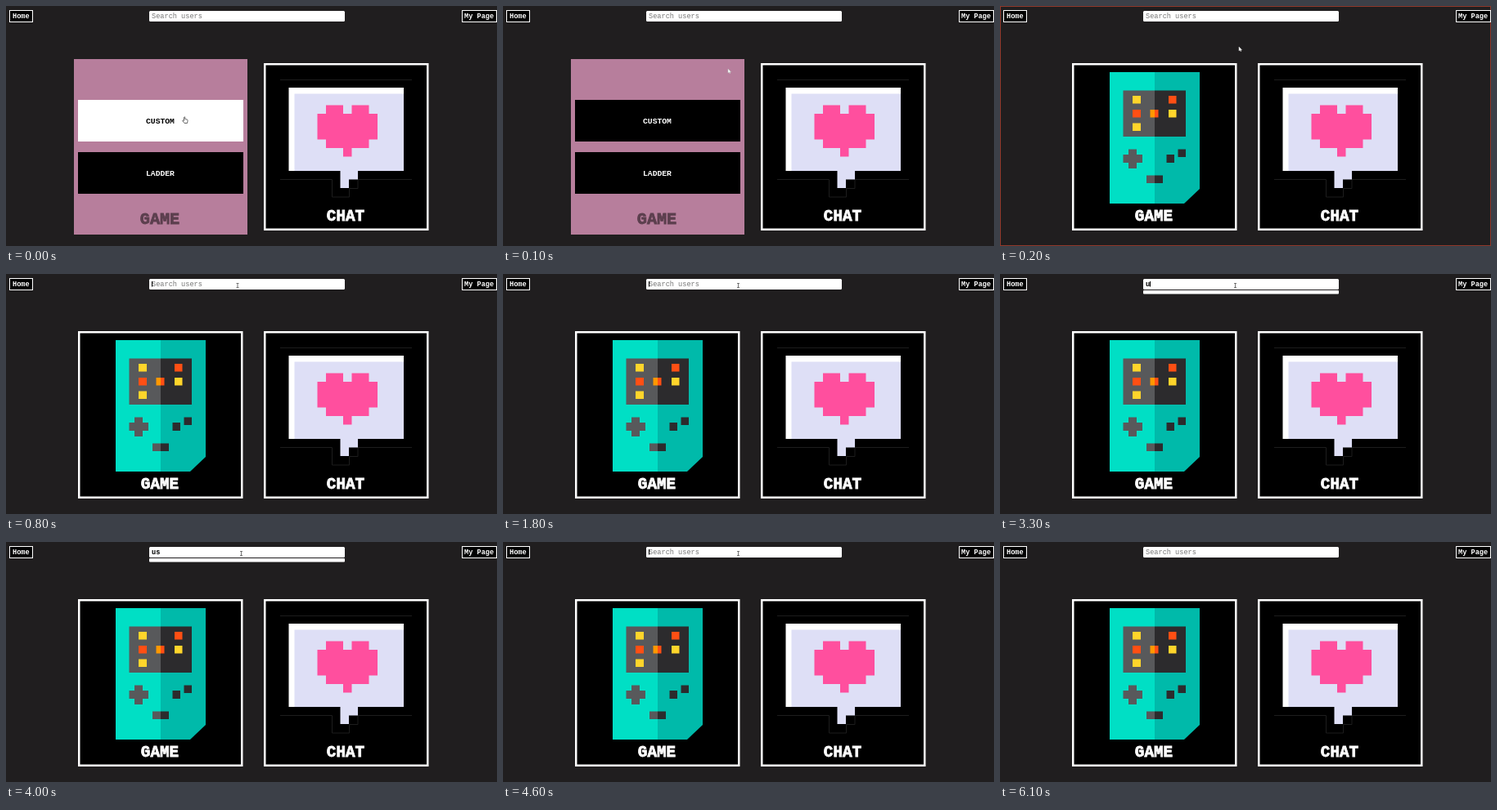
These frames come from a looping animation (600 px wide and 294 px high, 6.2 s). An HTML page:

```html
<!DOCTYPE html>
<html lang="en">
<head>
<meta charset="utf-8">
<title>Lobby</title>
<style>
  html, body { margin: 0; width: 100%; height: 100%; overflow: hidden; background: #201e1f; }
  svg { display: block; }
  text { font: bold 8.6px "Liberation Mono", monospace; fill: #fff; }
  .mid { text-anchor: middle; }
  .title { font-size: 19.3px; stroke: #fff; stroke-width: .8; }
  .option { font-size: 9.7px; stroke-width: .25; }
  .frame { fill: #000; stroke: #fff; stroke-width: 2.5; }
  .nav { fill: #000; stroke: #fff; }
  .hover rect, .dark { fill: #fff; }
  .hover text { fill: #000; }
</style>
</head>
<body>
<svg width="600" height="294" viewBox="0 0 600 294">
  <rect width="600" height="294" fill="#201e1f"/>
  <rect id="edge" x=".5" y=".5" width="599" height="293" fill="none" stroke="#90392b"/>

  <rect class="nav" x="4.5" y="5.5" width="28" height="14"/>
  <text x="8" y="15">Home</text>
  <rect class="nav" x="557.5" y="5.5" width="42" height="14"/>
  <text x="560" y="15">My Page</text>

  <rect x="175" y="6" width="239" height="13" rx="1.5" fill="#fff"/>
  <rect id="results" x="175" y="20" width="239" height="4.5" rx="1" fill="#fff"/>
  <text id="query" x="178" y="15"></text>
  <rect id="caret" y="9" width="1" height="6.5" fill="#000"/>

  <g id="game">
    <rect class="frame" x="89.25" y="71.25" width="199" height="202.5"/>
    <path fill="#00dfc5" d="M134 81h55v161h-55z"/>
    <path fill="#00baaa" d="M189 81h55v143l-19 18h-36z"/>
    <path fill="#58595b" d="M150.5 103.5h38.5v56.5h-38.5zM150.5 182h6.5v-6.5h10v6.5h7v10h-7v7h-10v-7h-6.5zM179 207.5h10v9.5h-10z"/>
    <path fill="#2c2b2d" d="M189 103.5h38v56.5h-38zM203.5 182h9.5v10h-9.5zM217.5 175.5h9.5v9.5h-9.5zM189 207.5h10v9.5h-10z"/>
    <path fill="#ffd52b" d="M162 110h10v9.5h-10zM206 127h9.5v9.5h-9.5zM162 143.5h10v9.5h-10z"/>
    <path fill="#ff4f14" d="M206 110h9.5v9.5h-9.5zM162 127h10v9.5h-10zM189 127h4.5v9.5h-4.5z"/>
    <path fill="#ff9800" d="M183.5 127h5.5v9.5h-5.5z"/>
    <text class="title mid" x="188" y="262.5">GAME</text>
  </g>

  <g id="menu">
    <rect x="83" y="65" width="212" height="215" fill="#b77e9c"/>
    <g id="custom">
      <rect x="88" y="115" width="202" height="51"/>
      <text class="option mid" x="188.5" y="143.5">CUSTOM</text>
    </g>
    <rect x="88" y="179" width="202" height="51"/>
    <text class="option mid" x="188.5" y="207.5">LADDER</text>
    <text class="title mid" x="188" y="267" style="font-size:20.2px;fill:#5c3f4e;stroke:#5c3f4e">GAME</text>
  </g>

  <rect class="frame" x="316.25" y="71.25" width="199" height="202.5"/>
  <path fill="none" stroke="#1d1d1d" d="M335 90.5h161M335 212.5h63.5v21.5h21v-10.5h10.5v-11h66"/>
  <path fill="#fff" d="M345.5 100h140.5v102h-140.5z"/>
  <path fill="#dedff6" d="M352.5 107.5h133.5v94.5h-56v10.5h-11v10.5h-10.5v-21h-56z"/>
  <path fill="#ff4f9e" d="M391 121.5h21v10.5h10.5v-10.5h21v10.5h10.5v31.5h-10.5v10.5h-21v10.5h-10.5v-10.5h-21v-10.5h-10.5v-31.5h10.5z"/>
  <text class="title mid" x="415" y="262.5">CHAT</text>

  <path id="cursor" stroke-linejoin="round"/>
</svg>
<script>
  const LOOP = 6200, STEP = 100, CHAR = 5.16, TEXT_X = 178;
  const el = id => document.getElementById(id);
  const show = (id, on) => el(id).setAttribute("visibility", on ? "visible" : "hidden");
  const set = (id, attrs) => {
    for (const name in attrs) el(id).setAttribute(name, attrs[name]);
  };

  const shapes = {
    hand: { d: "M1.5 4.5V.8Q2.2-.2 2.9.8V3l2.6.7q.7.3.6 1L5.5 8H2L-.4 5Q0 4 1.5 5z",
            fill: "#fff", stroke: "#444", "stroke-width": .8 },
    arrow: { d: "M0 0V5L1.2 4 2 5.6 2.8 5.2 2.1 3.7H3.6z",
             fill: "#fff", stroke: "#bbb", "stroke-width": .6 },
    beam: { d: "M-1.5-2.5H1.5M0-2.5V2.5M-1.5 2.5H1.5",
            fill: "none", stroke: "#555", "stroke-width": .8 }
  };

  // [start, shape, x, y]
  const moves = [
    [0, "hand", 216, 135.5], [100, "arrow", 275, 77], [200, "arrow", 292, 50],
    [300, "arrow", 291, 33], [400, "arrow", 287, 22], [500, "beam", 283, 14],
    [900, "beam", 282.5, 14], [1300, "beam", 287.5, 14], [5600, "beam", 287, 11],
    [5700, "arrow", 285, 5], [5800, "arrow", 284, 0], [5900, "arrow", 284, -20]
  ];

  // [start, text]; each entry restarts the caret blink
  const edits = [
    [800, ""], [2200, "a"], [2700, "te"], [2900, "t"], [3100, ""],
    [3300, "u"], [3500, "us"], [4400, "u"], [4600, ""]
  ];

  const latest = (list, t) => list.filter(item => item[0] <= t).pop();

  function draw(t) {
    const [, shape, x, y] = latest(moves, t);
    set("cursor", { ...shapes[shape], transform: `translate(${x} ${y})` });

    show("menu", t < 200);
    show("game", t >= 200);
    show("edge", t >= 200 && t < 400);
    el("custom").setAttribute("class", t < 100 ? "hover" : "");

    const [since, text] = latest(edits, t) || [Infinity, ""];
    el("query").textContent = text || "Search users";
    el("query").style.fill = text ? "#000" : "#757575";
    el("query").style.fontWeight = text ? "bold" : "normal";
    show("results", text && t >= 2300);
    show("caret", t >= since && (t - since) % 1000 < 500);
    set("caret", { x: TEXT_X + Math.round(text.length * CHAR) });
  }

  const start = performance.now();
  function tick() {
    const t = (performance.now() - start) % LOOP;
    draw(Math.floor(t / STEP) * STEP);
    requestAnimationFrame(tick);
  }
  tick();
</script>
</body>
</html>
```
